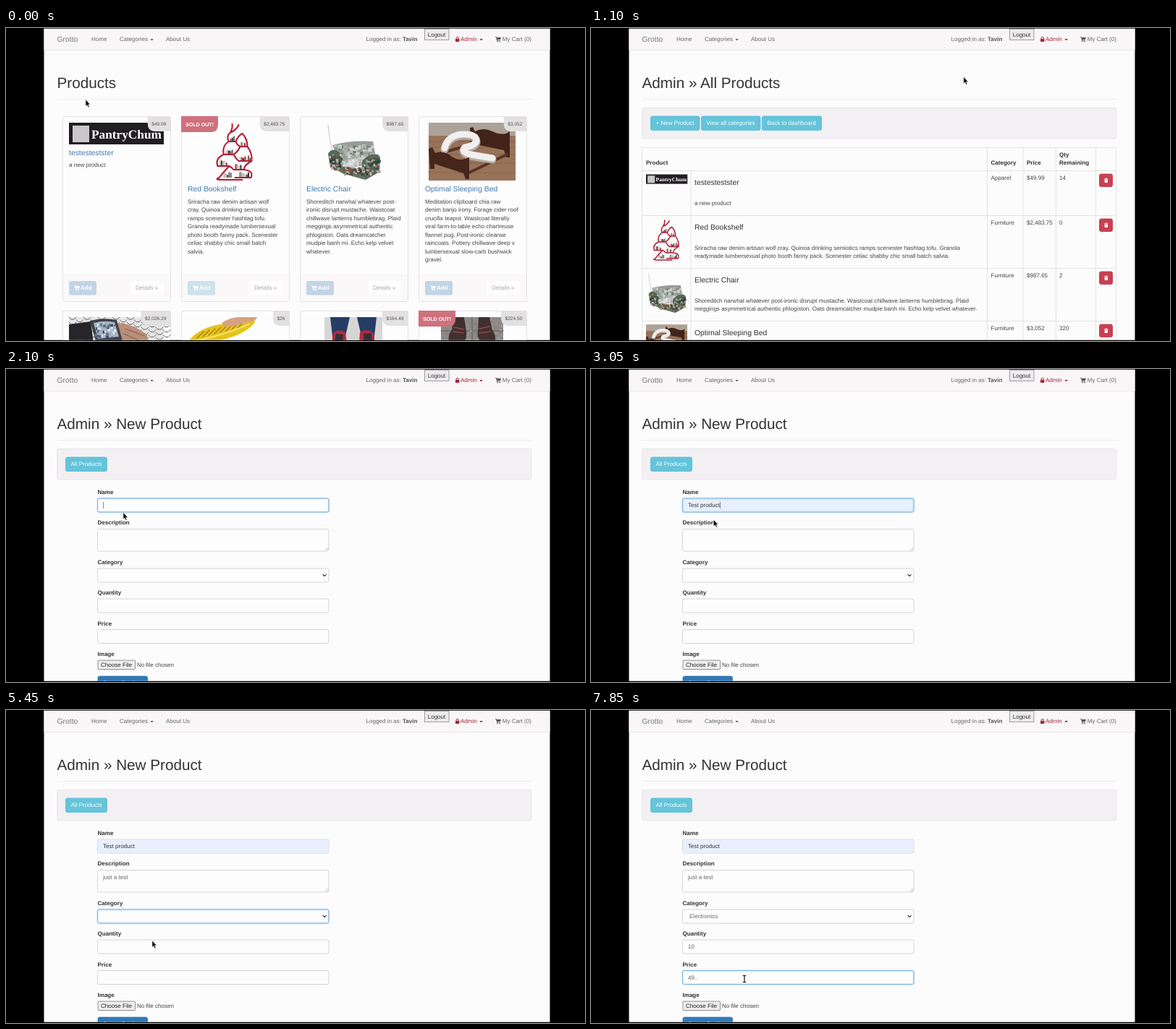
An HTML page for the animation above (8 s loop, 800 by 433 pixels).

```html
<!DOCTYPE html>
<html lang="en">
<head>
<meta charset="utf-8">
<title>Shop admin</title>
<style>
html, body { margin: 0; height: 100%; overflow: hidden; background: #000; }
svg { display: block; width: 100vw; height: 100vh; }
text { font-family: "Liberation Sans", Arial, sans-serif; text-rendering: geometricPrecision; white-space: pre; }
.serif { font: bold 17.3px "Liberation Serif", serif; }
</style>
</head>
<body>
<svg id="stage" viewBox="0 0 800 433"></svg>
<script>
const LOOP = 8000, BODY = 8.06, INK = '#444', LINE = '#dedcdd';
let seed = 11;
const rnd = () => (seed = seed * 16807 % 2147483647) / 2147483647;
const pick = list => list[Math.floor(rnd() * list.length)];

// Drawing helpers; text is placed by its vertical centre
const rect = (x, y, w, h, fill, more = '') =>
  `<rect x="${x}" y="${y}" width="${w}" height="${h}" fill="${fill}" ${more}/>`;
const box = (x, y, w, h, fill, edge = LINE, r = 2.3, more = '') =>
  rect(x + .5, y + .5, w - 1, h - 1, fill, `stroke="${edge}" stroke-width=".8" rx="${r}" ${more}`);
const path = (d, fill, more = '') => `<path d="${d}" fill="${fill}" ${more}/>`;
const line = (d, color, w = 1) =>
  path(d, 'none', `stroke="${color}" stroke-width="${w}" stroke-linecap="round" stroke-linejoin="round"`);
const text = (x, y, str, color = INK, size = BODY, more = '') =>
  `<text x="${x}" y="${y + size * .355}" fill="${color}" font-size="${size}" ${more}>${str}</text>`;
const bold = (x, y, str, color = '#333', size = BODY) => text(x, y, str, color, size, 'font-weight="bold"');
const at = (x, y, art, scale = 1) => `<g transform="translate(${x} ${y}) scale(${scale})">${art}</g>`;
const group = (id, art, more = '') => `<g id="${id}" ${more}>${art}</g>`;

const cart = color => path('M0 0h1.6l.3.9h6l-.9 3.3h-4.3l.2.8h4v.7h-4.7l-1.1-4.9h-1.1z', color) +
  `<g fill="${color}"><circle cx="3" cy="6.7" r=".8"/><circle cx="6.4" cy="6.7" r=".8"/></g>`;
const lock = color => rect(0, 3, 5.4, 4, color, 'rx=".5"') + line('M1.1 3V2a1.6 1.6 0 0 1 3.2 0V3', color);
const bin = path('M0 1h1.6l.5-1h1.4l.5 1h1.6v.8h-5.6zM.5 2.3h4.6l-.3 4.2h-4z', '#fff');
const caret = (x, color) => path(`M${x} 15h4.6l-2.3 2.4z`, color);

// Product pictures
const specks = (n, x, y, w, h, colors, size) => Array.from({ length: n }, () =>
  rect((x + rnd() * w).toFixed(1), (y + rnd() * h).toFixed(1), (size * (.5 + rnd())).toFixed(1), (size * (.5 + rnd())).toFixed(1), pick(colors))).join('');
const banner = rect(0, 0, 131, 30, '#201e20') + rect(5, 4, 23, 23, '#c9c7c9') +
  '<text class="serif" x="31" y="21.5" fill="#fff">PantryChum</text>';

const books = (x, y, n) => Array.from({ length: n }, (_, i) => {
  const h = 4 + rnd() * 4;
  return rect(x + i * 2.3, y - h, 2, h, pick(['#333', '#d8cfbd', '#6d6a66', '#8a3a34', '#b9b3a6']));
}).join('');
const shelf = rect(0, 0, 80, 80, '#fefdfe') +
  [[33, 26, 3], [48, 33, 3], [26, 44, 5], [46, 53, 7], [18, 60, 5], [40, 65, 4], [24, 76, 5], [46, 76, 6]].map(b => books(...b)).join('') +
  line('M36 2Q37 8 33 14M45 3Q42 10 33 14M33 14Q28 18 31 26H41Q44 18 50 15M50 15Q57 22 57 33H47Q42 30 41 26M31 26Q22 32 24 44H38Q44 40 47 33M57 33Q64 42 63 53H45Q41 50 38 44M24 44Q12 50 16 60H32Q36 62 38 65M63 53Q53 58 52 65H38M32 60Q26 66 18 76M52 65Q66 66 62 76H40M18 76Q10 79 24 79H50', '#b51c34', 2.1);

const board = ['#3d5744', '#8c4a40', '#93a58c', '#333c36', '#b9beb4'];
const chair = rect(0, 0, 80, 80, '#fefdfe') + line('M5 3Q6 18 10 36', '#aaa', .7) +
  path('M11 31Q38 24 67 26L71 48L22 56Z', '#959d96') + specks(70, 12, 30, 54, 18, ['#d0d2d1', '#63776a', '#a5b0a8', '#b9c0bc'], 4) +
  path('M22 54L56 47L62 57L32 64Z', '#cfcfd0') + specks(25, 27, 50, 28, 8, ['#e2e2e3', '#a9adad'], 3) +
  path('M5 43Q9 36 16 38Q24 42 24 50V69L8 62ZM52 53Q62 41 74 44L77 48L76 68L57 79L51 72Z', '#566a59') +
  path('M23 60L53 64L56 79L24 70Z', '#66745f') +
  specks(60, 6, 43, 16, 20, board, 3) + specks(60, 25, 61, 28, 10, board, 3) + specks(60, 54, 48, 20, 22, board, 3);

const hook = 'M22 37Q26 20 46 18Q66 17 66 27Q64 34 50 36Q44 42 58 46L88 51';
const bed = rect(0, 0, 120, 80, '#987359') + rect(0, 0, 120, 18, '#aca297') +
  [26, 34, 44, 56, 69].map(y => line(`M0 ${y}H120`, '#7f5d46', .7)).join('') +
  path('M57 7L61 6L64 12Q76 6 88 12Q98 17 107 15L112 12V48H107L104 38L65 30L62 36H58Z', '#42231a') +
  line('M10 44L60 30M54 70L108 44', '#5a3324', 4) +
  line(hook, '#b5aca5', 11) + at(0, -2, line(hook, '#f1efee', 9)) +
  path('M0 36L5 34L9 42Q22 38 32 47Q42 53 50 50L56 48V78H51L48 70L8 57V64H2Z', '#46261b');

const watch = rect(0, 0, 131, 80, '#e6e5e5') +
  Array.from({ length: 84 }, (_, i) => line(`M${i % 14 * 10} ${Math.floor(i / 14) * 7 + i % 2 * 3.5}l3 3h4l3-3`, '#444', .8)).join('') +
  path('M52 12L74 8L92 14L108 24L114 80H60Z', '#b98e78') + line('M78 16L104 26M76 23L98 33', '#8a6250', 1.2) +
  path('M0 10L30 6L40 80H0Z', '#26252a') +
  path('M29 5Q48 0 66 4L74 33H37Z', '#3b414a') + path('M34 8Q49 4 63 7L69 27L40 30Z', '#a6b4c1') +
  specks(36, 36, 8, 26, 19, ['#2f3e55', '#dce5e9', '#5d7289'], 3);
const slicer = path('M2 31Q16 14 48 9L92 2Q94 9 80 18Q62 30 34 33L5 39Z', '#e5c31c') +
  [0, 1, 2, 3, 4, 5, 6, 7].map(i => line(`M${12 + i * 8} ${29 - i * 2}l9-9`, '#a47c16', 1.3)).join('') +
  line('M6 33Q40 28 84 10', '#f6e16d', 2) + path('M46 8Q58 0 70 0H95Q94 6 80 7Q62 14 50 13Z', '#d7a281');
const shoes = rect(0, 0, 80, 80, '#d8d5d5') + path('M8 0H72L68 35H53L45 0H35L27 35H12Z', '#253d64') +
  path('M12 22Q20 15 29 21L31 36H10ZM49 21Q59 14 68 23L70 36H48Z', '#b32a3c') +
  path('M16 23L26 24L25 36H14ZM54 23L65 22L66 36H55Z', '#303038');
const boots = rect(0, 0, 86, 80, '#8c8987') + line('M43 0V80M0 19H86', '#615e5d', 1.2) +
  specks(70, 0, 0, 84, 34, ['#7a7775', '#a09d9a'], 2) +
  path('M17 0H32L35 20Q37 34 26 36H12Q8 26 15 18ZM52 0H67L71 18Q78 28 73 36H60Q49 32 51 20Z', '#42302e') +
  line('M18 14l13 3M53 16l14-3M17 20l14 2M53 22l15-2', '#8f4b4a', 1.5);

// Shop page
const products = [
  { name: 'testestestster', price: '$49.99', cat: 'Apparel', qty: 14, about: ['a new product'], wide: ['a new product'] },
  { name: 'Red Bookshelf', price: '$2,483.75', cat: 'Furniture', qty: 0, sold: true,
    about: ['Sriracha raw denim artisan wolf', 'cray. Quinoa drinking semiotics', 'ramps scenester hashtag tofu.', 'Granola readymade lumbersexual', 'photo booth fanny pack. Scenester', 'celiac shabby chic small batch', 'salvia.'],
    wide: ['Sriracha raw denim artisan wolf cray. Quinoa drinking semiotics ramps scenester hashtag tofu. Granola', 'readymade lumbersexual photo booth fanny pack. Scenester celiac shabby chic small batch salvia.'] },
  { name: 'Electric Chair', price: '$987.65', cat: 'Furniture', qty: 2,
    about: ['Shoreditch narwhal whatever post-', 'ironic disrupt mustache. Waistcoat', 'chillwave lanterns humblebrag. Plaid', 'meggings asymmetrical authentic', 'phlogiston. Oats dreamcatcher', 'mudpie banh mi. Echo kelp velvet', 'whatever.'],
    wide: ['Shoreditch narwhal whatever post-ironic disrupt mustache. Waistcoat chillwave lanterns humblebrag. Plaid', 'meggings asymmetrical authentic phlogiston. Oats dreamcatcher mudpie banh mi. Echo kelp velvet whatever.'] },
  { name: 'Optimal Sleeping Bed', price: '$3,052', cat: 'Furniture', qty: 320,
    about: ['Meditation clipboard chia raw', 'denim banjo irony. Forage cider roof', 'crucifix teapot. Waistcoat literally', 'viral farm-to-table echo chartreuse', 'flannel pug. Post-ironic cleanse', 'raincoats. Pottery chillwave deep v', 'lumbersexual slow-carb bushwick', 'gravel.'], wide: [] }
];
const heading = str => text(70.5, 76, str, '#333', 20.7) + line('M71 98.5H726', '#eeecee', .8);

function card(x, y, price, sold, art) {
  const w = price.length * 3.68 - (price.match(/[.,]/g) || []).length * 1.84 + 11.5;
  return box(x, y, 150, 257, '#fefdfe') + art +
    path(`M${x + 149.5} ${y + .5}h${-w}v10q0 10.5 10 10.5h${w - 10}z`, '#e2e0e1') +
    text(x + 143.5, y + 11, price, '#555', 6.65, 'text-anchor="end"') +
    (sold ? path(`M${x} ${y}h51v12q0 10-10 10h-41z`, '#cf717d') + bold(x + 6, y + 11, 'SOLD OUT!', '#fff', 7.1) : '');
}
const shopCard = (p, i) => {
  const x = 78 + i * 164, top = i ? 222.5 : 172, first = i ? 240 : 189;
  const art = [at(87, 131, banner), at(276.5, 131, shelf), at(440, 131, chair), at(584, 131, bed)][i];
  return card(x, 122, p.price, p.sold, art) +
    text(x + 9, top, p.name, '#3f78ad', 10.36) +
    p.about.map((s, n) => text(x + 9, first + n * 11.5, s)).join('') +
    rect(x + 1, 342, 148, 36, '#faf8f9') + line(`M${x + 1} 342H${x + 149}`, '#f1eff1', .8) +
    rect(x + 9, 350, 38, 19.5, p.sold ? '#cde2ec' : '#c2d5e6', 'rx="2.3"') +
    at(x + 16, 356, cart('#fff')) + bold(x + 25, 359.5, 'Add', '#fff') +
    rect(x + 94, 350, 46, 19.5, '#fefdfe', 'rx="2.3"') + text(x + 101, 359.5, 'Details »', '#aaa');
};
const shop = heading('Products') + products.map(shopCard).join('') +
  card(78, 391, '$2,026.29', false, at(87, 400, watch)) + card(242, 391, '$26', false, at(252, 400, slicer)) +
  card(406, 391, '$164.49', false, at(440, 400, shoes)) + card(570, 391, '$224.50', true, at(601, 400, boots));

// Admin pages
const well = box(70, 110, 656.5, 43.5, '#f2f0f2', '#e5e3e5');
const button = (x, w, str) => box(x, 121.5, w, 20.5, '#64c4da', '#52bcd6') + text(x + 7.5, 131.5, str, '#fff');
const rowTops = [197, 259, 332, 405];
const list = heading('Admin » All Products') + well +
  button(82, 68.5, '+ New Product') + button(152, 82.5, 'View all categories') + button(236, 83, 'Back to dashboard') +
  line('M70.5 433V165.5H725.5V433M138 197V433M547.5 165V433M597 165V433M642.5 165V433M697.5 165V433' +
    rowTops.map(y => `M70.5 ${y + .5}H725.5`).join(''), LINE, .8) +
  bold(76, 186.5, 'Product') + bold(552.5, 186.5, 'Category') + bold(602, 186.5, 'Price') +
  bold(647, 175, 'Qty') + bold(647, 186.5, 'Remaining') +
  products.map((p, i) => {
    const y = rowTops[i];
    return at(76, y + 5.5, [banner, shelf, chair, bed][i], [.437, .715, .715, .475][i]) +
      text(143, y + 16, p.name, '#333', 10.36) +
      p.wide.map((s, n) => text(143, y + 45 + n * 11.5, s)).join('') +
      text(552.5, y + 10.5, p.cat) + text(602, y + 10.5, p.price) + text(647, y + 10.5, p.qty) +
      box(702, y + 4.5, 19, 18.5, '#cb3f52', '#c03146') + at(709, y + 10.5, bin);
  }).join('');

const fields = [['Name', 170, 178.5, 20], ['Description', 212.5, 221, 31.5], ['Category', 267, 275.5, 20],
  ['Quantity', 309, 317.5, 20], ['Price', 352, 360, 20]];
const input = i => box(126, fields[i][2], 320.5, fields[i][3], '#fefdfe', '#cccacc');
const form = heading('Admin » New Product') + well + button(82, 58, 'All Products') +
  fields.map((f, i) => bold(126.5, f[1], f[0]) + input(i)).join('') +
  rect(127, 179.5, 318.5, 18, '#e7f0fc', 'id="filled" rx="2"') +
  line('M441 251l4-4M443.5 251l1.5-1.5', '#999', .6) + line('M437.8 284.3l2.2 2.2 2.2-2.2', '#333', 1.1) +
  box(126, 317.5, 320.5, 20, 'none', '#66afe9', 2.3, 'id="ring" filter="url(#glow)"') +
  fields.map((f, i) => text(i == 2 ? 136 : 134, i == 1 ? 231 : f[2] + 10, '', i ? '#666' : '#333', BODY, `id="val${i}"`)).join('') +
  rect(134, 0, .7, 9, '#555', 'id="caret"') +
  group('spin', rect(430, 323, 8, 9, '#c9c7c9') + path('M432 326.5l2-2 2 2zM432 328.5l2 2 2-2z', '#555')) +
  bold(126.5, 394, 'Image') + box(126.5, 402.5, 52.5, 13.5, '#efedef', '#777', 1) +
  text(131, 409, 'Choose File', '#222') + text(181, 409, 'No file chosen') +
  box(126.5, 424.5, 69.5, 20, '#327ab7', '#2c6ca5') + text(133.5, 434.5, 'Create Product', '#fff');

const nav = rect(52, 1, 700, 29.5, '#f8f6f7') + line('M52.5 30.5H751.5', '#e6e4e6', .9) +
  rect(613, 1, 55, 29.5, '#e6e4e6', 'id="active"') +
  text(70.5, 15.5, 'Grotto', '#777', 10.36) + text(118, 15.5, 'Home', '#666') +
  text(157, 15.5, 'Categories', '#666') + caret(199.3, '#666') + text(221, 15.5, 'About Us', '#666') +
  text(497.5, 15.5, 'Logged in as:', '#666') + bold(548, 15.5, 'Tavin', '#555') +
  rect(578.5, 1.5, 33.5, 15, '#edebed', 'stroke="#8a888a" stroke-width=".8"') + text(582.7, 9, 'Logout', '#333') +
  at(621, 12, lock('#a3283c')) + text(628, 15.5, 'Admin', '#a3283c') + caret(654.3, '#a3283c') +
  at(676, 12, cart('#555')) + text(685.7, 15.5, 'My Cart (0)', '#666');
const menu = box(575, 30, 93, 52, '#fefdfe', '#c8c6c8', 2, 'filter="url(#shade)"') +
  ['Dashboard', 'Products', 'Categories'].map((s, i) => text(587.5, 41 + i * 15, s)).join('');

const stage = document.getElementById('stage');
stage.innerHTML = `<defs>
  <filter id="glow" x="-5%" y="-50%" width="110%" height="200%"><feDropShadow dx="0" dy="0" stdDeviation="1.3" flood-color="#66afe9" flood-opacity=".7"/></filter>
  <filter id="shade" x="-10%" y="-10%" width="120%" height="130%"><feDropShadow dx="0" dy="2.5" stdDeviation="2" flood-opacity=".2"/></filter>
  <clipPath id="page"><rect x="52.5" y=".7" width="699" height="431.1"/></clipPath></defs>` +
  rect(0, 0, 800, 433, '#000') +
  group('view', rect(52, 0, 700, 433, '#fdfcfd') + nav + group('shop', shop) + group('list', list) + group('form', form) + group('menu', menu), 'clip-path="url(#page)"') +
  group('pointer',
    group('arrow', path('M0 0v9.2l2-1.8 1.5 3.3 1.5-.7-1.5-3.1h2.8z', '#000', 'stroke="#fff" stroke-width=".5"')) +
    group('hand', path('M0 0q1 0 1 1v3.8l3.2.8q1.5.5 1.3 2l-.7 4h-4.4l-3.2-4.2q.2-1.2 1.8 0V1q0-1 1-1z', '#000', 'stroke="#fff" stroke-width=".4"')) +
    group('beam', line('M-1.7-4.5h3.4M0-4.5v9M-1.7 4.5h3.4', '#000', 1.1)));

// Timeline
const moves = [[0, 110, 99, 'arrow'], [50, 110, 99, 'arrow'], [450, 643.5, 18.5, 'hand'], [550, 643.5, 18.5, 'hand'],
  [800, 604, 54, 'hand'], [1000, 604, 54, 'arrow'], [1350, 162, 121, 'arrow'], [1450, 162, 121, 'arrow'], [1600, 138, 130, 'hand'],
  [1800, 138, 130, 'arrow'], [2050, 162, 198.5, 'arrow'], [2950, 162, 198.5, 'arrow'], [3250, 190, 236, 'beam'],
  [4200, 190, 236, 'arrow'], [4450, 258, 288.5, 'arrow'], [5050, 258, 288.5, 'arrow'], [5500, 200, 320, 'arrow'],
  [5750, 200, 320, 'arrow'], [6100, 433, 326, 'arrow'], [6750, 433, 326, 'arrow'], [7000, 212, 372, 'beam'], [LOOP, 212, 372, 'beam']];
const focusTimes = [[0, 0], [3250, 1], [4300, 2], [5950, 3], [6950, 4]];
const nameTyped = [[0, ''], [2250, 'T'], [2400, 'Te'], [2550, 'Tes'], [2950, 'Test product']];
const priceTyped = [[0, ''], [7350, '4'], [7500, '49'], [7600, '49.'], [7850, '49..']];
const latest = (keys, t) => keys.filter(k => k[0] <= t).pop()[1];
const clamp = (v, lo, hi) => Math.max(lo, Math.min(hi, v));
const $ = id => document.getElementById(id);
const show = (id, on) => $(id).style.display = on ? '' : 'none';

function draw(t) {
  const page = t < 1000 ? 'shop' : t < 1800 ? 'list' : 'form';
  ['shop', 'list', 'form'].forEach(id => show(id, id == page));
  const open = t >= 450 && t < 1000;
  show('menu', open);
  show('active', open);

  const values = [latest(nameTyped, t), 'just a test'.slice(0, clamp(Math.floor((t - 3400) / 50), 0, 11)),
    t < 5700 ? '' : 'Electronics', t < 6200 ? '' : clamp(Math.floor((t - 6200) / 50), 1, 10), latest(priceTyped, t)];
  values.forEach((v, i) => $('val' + i).textContent = v);
  const focus = latest(focusTimes, t), [, , y, h] = fields[focus];
  $('ring').setAttribute('y', y + .5);
  $('ring').setAttribute('height', h - 1);
  $('caret').setAttribute('x', 134.2 + $('val' + focus).getComputedTextLength());
  $('caret').setAttribute('y', y + 5.5);
  show('caret', focus != 2 && t % 1000 < 500);
  show('filled', t >= 2950);
  show('spin', t >= 6100 && t < 6800);

  const n = moves.findIndex(m => m[0] > t), a = moves[n - 1], b = moves[n];
  const u = (t - a[0]) / (b[0] - a[0]), e = u * u * (3 - 2 * u);
  $('pointer').setAttribute('transform', `translate(${a[1] + (b[1] - a[1]) * e} ${a[2] + (b[2] - a[2]) * e})`);
  ['arrow', 'hand', 'beam'].forEach(id => show(id, id == a[3]));
}

const start = performance.now();
function tick() {
  draw((performance.now() - start) % LOOP);
  requestAnimationFrame(tick);
}
tick();
</script>
</body>
</html>
```
